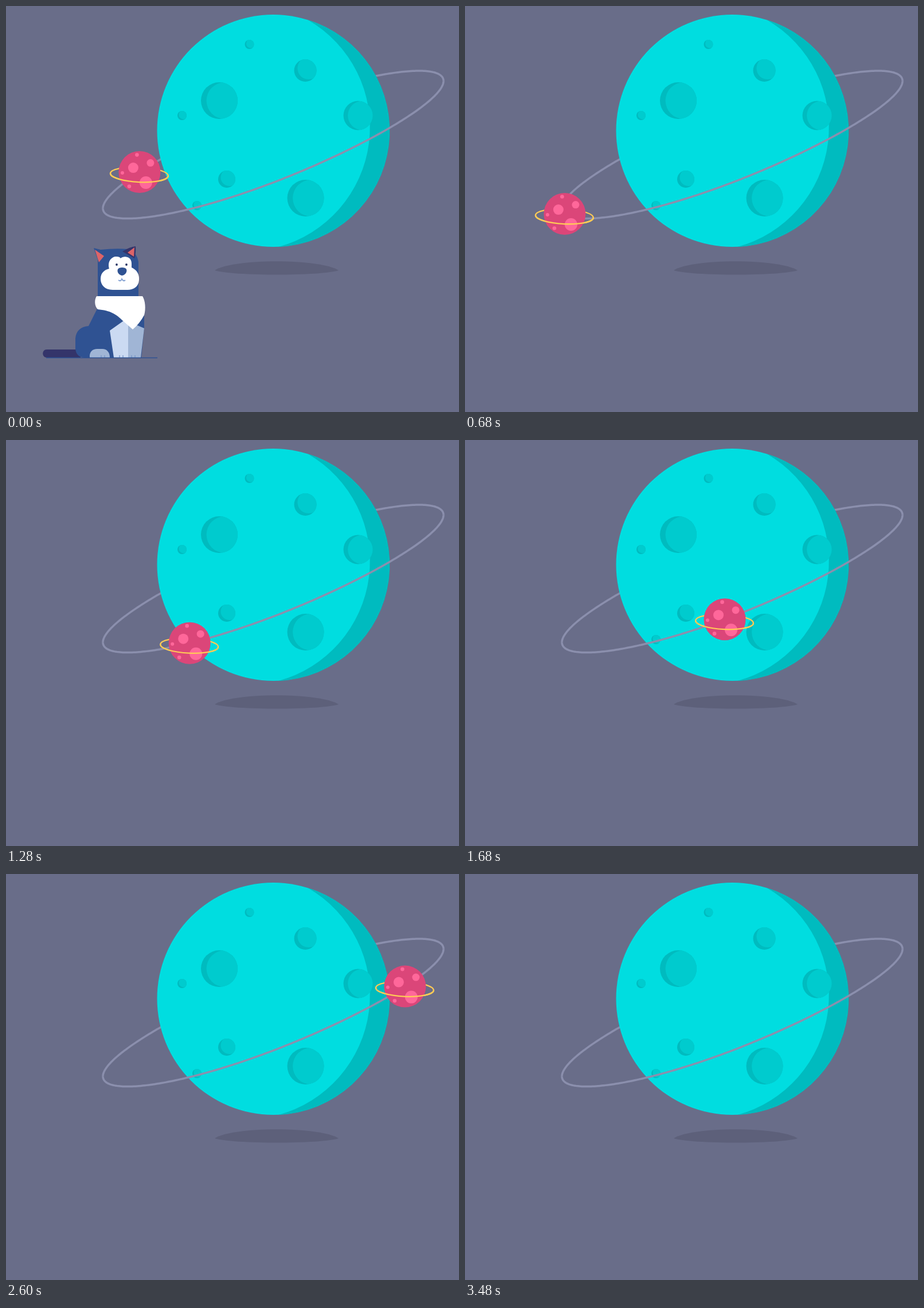
Animation, 790 px wide and 708 px high, one loop 4000 ms. Source, as an HTML page with a canvas:

```html
<!DOCTYPE html>
<html lang="en">
<head>
<meta charset="utf-8">
<title>Orbit</title>
<style>
html, body { margin: 0; width: 100%; height: 100%; overflow: hidden; background: #696d89; }
canvas { display: block; }
</style>
</head>
<body>
<canvas id="stage" width="790" height="708"></canvas>
<script>
const ctx = document.getElementById('stage').getContext('2d');
const LOOP = 4000, STEP = 40, DOG_END = 40, MOON_END = 3480;
const START_ANGLE = 218.3, ORBIT_COLOR = '#8b8fad';

// x, y, radius
const CRATERS = [[372, 165, 32], [522, 112.5, 19.5], [614, 191, 25.5], [522.5, 335, 32],
  [385, 302, 15], [333, 348, 8], [424.5, 67, 8], [307, 191, 8]];
const SPOTS = [[-11, -7.5, 9], [19, -16, 6.5], [-4.5, -30, 3.3], [-30, 1.5, 3], [-18, 25, 3.3], [11, 18.5, 11]];

function fill(path, color) {
  ctx.fillStyle = color;
  ctx.fill(new Path2D(path));
}

function stroke(path, color, width) {
  ctx.strokeStyle = color;
  ctx.lineWidth = width;
  ctx.stroke(new Path2D(path));
}

function disc(x, y, r, color) {
  ctx.beginPath();
  ctx.arc(x, y, r, 0, 2 * Math.PI);
  ctx.fillStyle = color;
  ctx.fill();
}

// A tilted ellipse whose near side sags a little
function orbitPoint(degrees) {
  const c = Math.cos(degrees * Math.PI / 180), s = Math.sin(degrees * Math.PI / 180);
  return { x: 466 + 297 * c, y: 241.8 - 111 * c + 63.7 * s + 2.3 * s * s * (s - c) };
}

// Fine points along the orbit, each with its distance from the start
const track = [];
for (let i = 0, length = 0; i < 3600; i++) {
  const p = orbitPoint(START_ANGLE - i / 10), last = track[i - 1] || p;
  length += Math.hypot(p.x - last.x, p.y - last.y);
  track.push({ ...p, length });
}

// Distance in px: a slow start that speeds up, then a fast swing that slows down
const TURN = 1120;
const speedUp = t => 0.12 * t + 0.000047 * t * t;
const slowDown = t => 0.377 * t - 0.000041 * t * t;
const travelled = t => t < TURN ? speedUp(t) : speedUp(TURN) + slowDown(t - TURN);

function drawOrbit(from, to) {
  ctx.beginPath();
  for (let a = from; a <= to; a++) {
    const p = orbitPoint(a);
    ctx.lineTo(p.x, p.y);
  }
  ctx.strokeStyle = ORBIT_COLOR;
  ctx.lineWidth = 3.5;
  ctx.stroke();
}

function drawPlanet() {
  fill('M364 461C395 440 548 440 580 461C550 471 395 471 364 461', '#5d607a');
  drawOrbit(180, 360);
  disc(466, 217.5, 202.5, '#00dde0');
  fill('M526 24A202.5 202.5 0 0 1 475 420A216 216 0 0 0 526 24', '#00bbbf');
  for (const [x, y, r] of CRATERS) {
    disc(x, y, r, '#00bbbf');
    ctx.save();
    ctx.clip();
    disc(x + 0.3 * r, r < 20 ? y - 0.2 * r : y, r, '#00cbce');
    ctx.restore();
  }
  drawOrbit(0, 180);
}

function drawBand(end) {
  ctx.beginPath();
  ctx.ellipse(-0.5, 4.5, 50.5, 13, 0.045, 0, end);
  ctx.strokeStyle = '#ffcb55';
  ctx.lineWidth = 2.3;
  ctx.stroke();
}

function drawMoon(t) {
  const distance = travelled(t);
  const { x, y } = track.find(p => p.length >= distance);
  ctx.save();
  ctx.translate(x, y);
  drawBand(2 * Math.PI);
  disc(0, 0, 36.5, '#db4679');
  for (const spot of SPOTS) disc(...spot, '#ff679a');
  drawBand(Math.PI);
  ctx.restore();
}

function drawDog() {
  const blue = '#2f5292', navy = '#34346a', pink = '#dd6468', gray = '#a0b5d5', white = '#fff';
  // tail, body and legs
  fill('M71 599H130V613H71C62 613 62 599 71 599', navy);
  fill('M160 526L144 558C130 559 122 567 121 580V598Q123 613 137 613H236L241 560V520Z', blue);
  fill('M146 613C145 603 151 598 159 598H168C176 598 181 604 181 613Z', gray);
  fill('M205 549L181 566L188 613H213V549Z', '#cbdaf2');
  fill('M213 550L241 562L235 613H213Z', gray);
  for (const paw of [166, 198, 219])
    for (let toe = 0; toe < 2; toe++) stroke(`M${paw + 6 * toe} 609v4`, '#7896c6', 1.3);
  stroke('M70 613.5H264', blue, 1.4);
  // head, bib and ears
  fill('M160 507V440L165 425Q190 422 215 424Q229 432 231 446V507Z', blue);
  fill('M158 506H238C243 514 244 528 241 539Q233 554 221 564L205 550C192 537 182 531 160 529C154 523 154 512 158 506', white);
  fill('M153 422L173 427L162 448Z', blue);
  fill('M155 425L171 436L162 447Z', pink);
  fill('M203 428Q216 420 226 419Q227 430 224 440Z', navy);
  fill('M212 430L224 421L223 437Z', pink);
  // face
  fill('M180 458C176 444 186 436 193 437Q198 437 200 440C205 435 219 436 219 449V456C228 460 233 468 232 478C231 490 222 495 212 495H186C172 495 165 486 165 476C165 465 172 460 180 458', white);
  for (const eye of [193, 210]) disc(eye, 451, 1.9, '#2a3564');
  fill('M195 459C197 455 208 455 210 459C212 464 207 470 202 470C197 469 193 464 195 459', blue);
  stroke('M196 478Q200 481 202 476Q205 481 208 478', '#86a3d3', 2);
}

function frame(now) {
  const t = Math.floor((now % LOOP) / STEP) * STEP;
  ctx.fillStyle = '#696d89';
  ctx.fillRect(0, 0, 790, 708);
  drawPlanet();
  if (t < MOON_END) drawMoon(t);
  if (t < DOG_END) drawDog();
  requestAnimationFrame(() => frame(performance.now() - start));
}

const start = performance.now();
frame(0);
</script>
</body>
</html>
```
